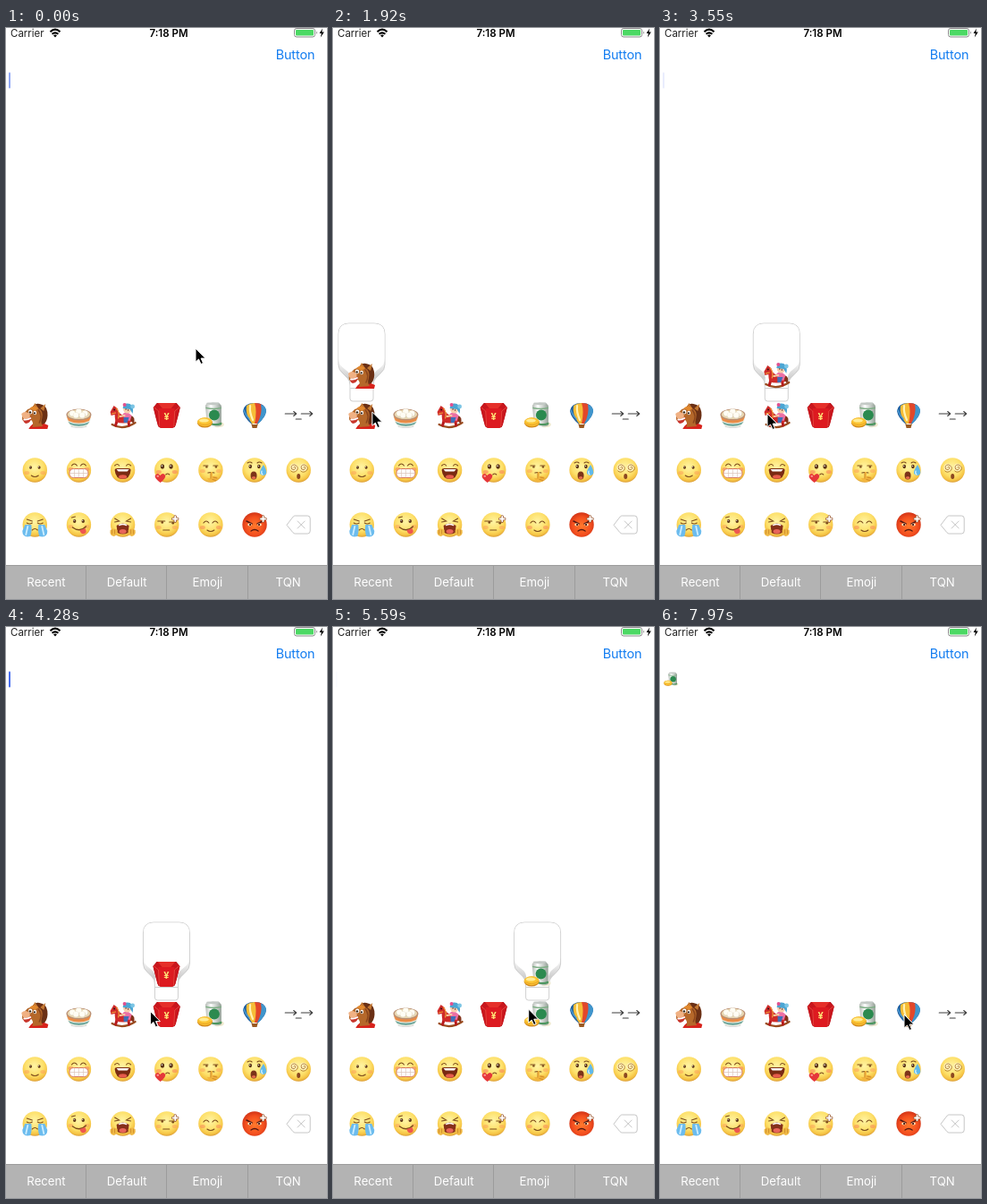
Animation, 359 px wide and 638 px high, one loop 8000 ms. Source, as an HTML page:

```html
<!DOCTYPE html>
<html lang="en">
<head>
<meta charset="utf-8">
<title>Emoticon keyboard</title>
<style>
  html, body { margin: 0; width: 100%; height: 100%; overflow: hidden; background: #fff; }
  svg { display: block; width: 100%; height: 100%; }
  text { font-family: Inter, Roboto, sans-serif; }
</style>
</head>
<body>
<svg id="stage" viewBox="0 0 359 638">
  <defs>
    <radialGradient id="skin" cx=".48" cy=".38" r=".62">
      <stop offset="0" stop-color="#fff4a4"/><stop offset=".6" stop-color="#fde06a"/>
      <stop offset=".86" stop-color="#f6c545"/><stop offset="1" stop-color="#dda038"/>
    </radialGradient>
    <radialGradient id="rage" cx=".5" cy=".55" r=".6">
      <stop offset="0" stop-color="#ff7a2c"/><stop offset=".6" stop-color="#f4501f"/>
      <stop offset="1" stop-color="#c92d14"/>
    </radialGradient>
    <linearGradient id="metal">
      <stop offset="0" stop-color="#b4bab4"/><stop offset=".35" stop-color="#fff"/>
      <stop offset="1" stop-color="#94a097"/>
    </linearGradient>
    <linearGradient id="shoulder" x2="0" y2="1">
      <stop offset=".45" stop-color="#fff"/><stop offset=".7" stop-color="#cfcfcf"/>
      <stop offset=".85" stop-color="#fff"/>
    </linearGradient>
  </defs>

  <g id="status">
    <text x="5" y="9.6" font-size="11.5" fill="#222">Carrier</text>
    <path d="M49.500 4.200q5.500-5 11 0M51.600 6.800q3.400-3 6.800 0" fill="none" stroke="#000" stroke-width="2.200"/>
    <path d="M53 8.300q2-1.500 4 0l-2 2.300z"/>
    <text x="182" y="9.600" font-size="11.500" font-weight="600" text-anchor="middle">7:18 PM</text>
    <rect x="322.500" y=".5" width="23" height="9.500" rx="2.500" fill="#fff" stroke="#8b8b8b"/>
    <rect x="324" y="2" width="20" height="6.500" rx="1" fill="#4cd964"/>
    <path d="M347 3.500q2 1.700 0 3.500z" fill="#8b8b8b"/>
    <path d="M354 .5l-3.500 5.500h2.300l-1 4.500 4-6h-2.500z"/>
  </g>
  <text x="323.500" y="35" font-size="14.400" text-anchor="middle" letter-spacing="-.1" fill="#127cf0">Button</text>

  <g id="keys"></g>
  <g id="tabs">
    <rect y="600" width="359" height="38" fill="#b3b3b3"/>
    <path d="M0 600.500H359M89.500 600V638M179.500 600V638M270.500 600V638" stroke="#9c9c9c"/>
  </g>

  <g id="typed"></g>
  <rect id="caret" y="49.500" width="2" height="18" rx="1" fill="#4a6ff0"/>
  <g id="popup">
    <path d="M-26 342q0-12 12-12h28q12 0 12 12v34q0 6-5 10l-5 5q-3 3-3 8v15q0 3-3 3h-20q-3 0-3-3v-15q0-5-3-8l-5-5q-5-4-5-10z"
      fill="url(#shoulder)" stroke="#c4c4c4" stroke-width=".8"/>
    <path d="M-25.500 342q0-11.500 11.500-11.500h28q11.500 0 11.500 11.500v28q0 6-4 9l-6 5q-3 3-3 8v10h-25v-10q0-5-3-8l-6-5q-4-3-4-9z" fill="#fff"/>
    <path d="M-12.500 402.500h25" stroke="#c4c4c4" stroke-width=".8"/>
    <g id="magnified"></g>
  </g>
  <path id="pointer" d="M0 0V15.200L3.500 12 6 17.500 8.500 16.400 6.100 11.100H11Z" fill="#000" stroke="#fff"/>
</svg>

<script>
const $ = id => document.getElementById(id);
const INK = '#7a4a1c';

// Drawing helpers, all centred on the key.
const dot = (x, y, r, fill) => `<circle cx="${x}" cy="${y}" r="${r}" fill="${fill}"/>`;
const oval = (x, y, rx, ry, fill) => `<ellipse cx="${x}" cy="${y}" rx="${rx}" ry="${ry}" fill="${fill}"/>`;
const fill = (d, color) => `<path d="${d}" fill="${color}"/>`;
const line = (d, color = INK, width = 1.1) =>
  `<path d="${d}" fill="none" stroke="${color}" stroke-width="${width}" stroke-linecap="round"/>`;
const face = (inner, skin = 'skin') => dot(0, 0, 13.7, `url(#${skin})`) + inner;
const blush = (y = 3, tint = '#fba05a88') => oval(-9, y, 3, 2, tint) + oval(9, y, 3, 2, tint);
const eyes = (y, r = 1.7, gap = 4.8) =>
  [-gap, gap].map(x => oval(x, y, r, r * 1.2, '#5a3214') + dot(x - .5, y - .7, r / 2.8, '#fff')).join('');
const arcs = (y, bend) => line(`M-8 ${y}q3 ${bend} 6 0M2 ${y}q3 ${bend} 6 0`);
const cross = line('M9.500-9v5M7-6.500h5', '#9c5a34', 3.400) + line('M9.500-9v5M7-6.500h5', '#fff', 1.8);

const horse =
  fill('M-7 15Q-2 6 6 7L15 11 14 15Z', '#d8231c') +
  fill('M-3-9Q0-14 5-13Q13-12 14-4Q15 4 11 9L4 11Z', '#6b3015') +
  fill('M-8-7Q-2-10 4-8Q10-5 8 3Q6 9 9 12L-3 13Q-1 8-4 5Q-11 9-14 5Q-16 0-8-7Z', '#b5682a') +
  fill('M-15-2Q-11-6-6-2Q-4 3-9 4Q-14 5-15-2Z', '#f0b184') +
  fill('M-13 4Q-7 4-4 1Q-4 8-10 9Q-13 8-13 4Z', '#c8352b') + line('M-12 4.500Q-8 5-5 3', '#fff', 1.8) +
  fill('M-3-8L0-14 4-8ZM6-8L12-13 10-5Z', '#c47731') + fill('M-6-8Q-1-13 4-8L0-5Z', '#e2892e') +
  oval(-5, -4, 2.200, 2.400, '#fff') + dot(-5.300, -3.600, 1.200, '#321') +
  oval(0, -3, 1.800, 2.200, '#fff') + dot(-.3, -2.600, 1.100, '#321') + line('M4-6Q9 0 5 8', '#8b451c', 1.500);

const bowl =
  oval(0, 12, 9, 1.8, '#ccc') +
  fill('M-14-1Q-13 12-5 13H5Q13 12 14-1Z', '#eef0e6') +
  fill('M-13.700 1Q-12 5-11.500 6Q0 11 11.500 6L13.700 1Q0 7-13.700 1Z', '#e98d48') +
  fill('M-12 7Q0 12 12 7L9.500 10Q0 14-9.500 10Z', '#72aaa0') +
  oval(0, -1, 14, 6.5, '#b98f74') + oval(0, -1.3, 12.6, 5.4, '#ead9b2') +
  [[-7, -2], [0, -4], [7, -2], [-3, 0], [4, 0]].map(([x, y]) => dot(x, y, 3.6, '#dfd4bd') + dot(x - .2, y - .5, 3.1, '#fffdf4')).join('');

const rocker =
  line('M-12 10Q0 17 14 8', '#9a4b1e', 2.2) + line('M-8 11L-6 4M7 11L6 4', '#b51b1d', 3) +
  fill('M-14-4L-10-11-6-8Q-4 0 3 0Q11-1 10 7Q0 10-8 7Q-9 2-9-1L-13 0Z', '#cf2b2a') +
  line('M-7-8Q-3-3-5 3M-12-2L-8-3', '#f1a23a', 1.200) + dot(-9.500, -6.500, 1, '#311') +
  fill('M9 0Q15 2 12 9L9 6Z', '#82331c') +
  fill('M0-2Q5-6 10 0L8 6 2 5Z', '#ec6fa4') + line('M2 0L-3 1', '#f7cda3', 2) +
  fill('M1 2H7L5 8H1Z', '#3f6fb8') +
  dot(5, -7, 4.500, '#f9cfad') + fill('M0-8Q1-15 8-13Q13-10 11-2L8-7Z', '#4ba6d4') +
  dot(2, -12, 2, '#e2508e') + dot(11, -10, 2.400, '#7cc5e4') + dot(3.500, -7, .7, '#422') + dot(6, -6, .7, '#422');

const envelope =
  fill('M-11-14H11L15-9 12 3 9 13Q0 15-9 13L-12 3-15-9Z', '#a90f17') +
  fill('M-15-9L-10-14-5-8-7 14-10 11ZM15-9L10-14 5-8 7 14 10 11Z', '#c9161d') +
  fill('M-10-14H10L5-8H-5Z', '#e5302a') + fill('M-9-8H9L7 14H-7Z', '#dd1a20') +
  line('M-14-9L-9-5-8 12M14-9L9-5 8 12', '#f0564a', .7) +
  '<text y="5" font-size="11" font-weight="700" fill="#ffe176" text-anchor="middle">¥</text>';

const can =
  fill('M7 8Q14 6 15 10Q14 14 5 13Z', '#f0ead0') +
  fill('M-6-11L-4-14.500H9L12-11 12 11Q6 14-4 11Z', 'url(#metal)') +
  oval(2.500, -13.200, 7, 1.500, '#c3c9c5') + line('M-5-8.500Q3-6.500 11.500-8.500', '#7fae86', 1.500) +
  dot(4, -.5, 6, '#2b8a4f') + line('M1 9.500Q7 11 11.500 9', '#4d9660', 2.200) +
  oval(-6.500, 8, 8.500, 5.500, '#cf8418') + oval(-6.500, 7.300, 8.200, 5, '#fbc433') +
  oval(-7.500, 5.600, 5.500, 2, '#ffec94') + line('M-13 9Q-6 13 1 8', '#e6a024', .9);

const balloon =
  line('M-4 7L-2.500 11M4 7L2.500 11', '#8b5425', 1) + fill('M-3.500 10H3.500L2.500 14H-2.500Z', '#9a5a24') +
  fill('M-13-5Q-12-14 0-14Q12-14 13-5Q12 2 4 9H-4Q-12 2-13-5Z', '#1f5f9f') +
  fill('M-9-11Q-5-14 0-14H2Q5-3 1 9H-3Q-11-1-9-11Z', '#f6bd37') +
  fill('M0-14Q6-14 8-12Q10-2 3 9H0Q3-5 0-14Z', '#e2472a') +
  fill('M7-12.500Q13-10 13-5Q12 2 4 9H3Q9-2 7-12.500Z', '#3f95cc') +
  line('M-12-6Q-10 0-6 4', '#4a9ad2', 1.500) + line('M-5-11Q-6-4-2 5', '#fff3b4', 2.200);

const arrows = line('M-15-2H-2.500M-5.500-4.500L-2.500-2-5.500 .5M3-2H15.500M12.500-4.500L15.500-2 12.500 .5', '#3c3c3c', 1.100) + line('M-3 4H3', '#3c3c3c', 1.100);

const hands = [-1, 1].map(side => `<g transform="scale(${side} 1)">` +
  fill('M6 6Q10 3 14 6Q15 12 10 13Q6 12 6 6Z', '#f0b944') + line('M9 6V10M12 6V10', '#c98527', .8) + '</g>').join('');

const smile = face(blush(3) + eyes(-3, 1.5) + line('M-4 6Q0 9 4 6'));
const grin = face(arcs(-5, -4) + blush(-1, '#f5845a99') +
  '<rect x="-10.500" y="-1.500" width="21" height="10" rx="4.500" fill="#fff" stroke="#d8755a"/>' +
  line('M-10 3.500H10M-5-1V8M0-1V8M5-1V8', '#dcc3b8', .7));
const laugh = face(line('M-9-5Q-6-8-4-5M4-5Q6-8 9-5') + fill('M-9 0Q-9-2-6-2H6Q9-2 9 0Q8 10 0 10Q-8 10-9 0Z', '#7a2a12') +
  fill('M-7-1H7L5 1.500H-5Z', '#fff') + oval(0, 7.500, 4.500, 2.200, '#e65b4b'));
const kiss = face(eyes(-4, 2.2) + blush(2, '#f8865a99') + line('M-1 5q2-2 4 0') +
  fill('M-7 14Q-14 9-13 6Q-10 2-7.500 6Q-4 2-1.500 6Q-1 9-7 14Z', '#e5373a') + oval(-10, 6.800, 1.4, 1, '#ff9a95'));
const hush = face(line('M-8-5H-3M3-5H8') + dot(-4.500, -3.600, 1.200, INK) + dot(6, -3.600, 1.200, INK) + line('M-3 3Q0 2 4 3') + blush(1) +
  fill('M0 2H2V7Q8 6 8 10Q5 14-1 13L-4 9H0Z', '#f3b63e') + line('M0 3V9M3 8L7 9M2 10.500L6 11.500', '#c57b25', .8));
const shock = face(line('M-8-8Q-5-10-3-8M3-8Q5-10 8-8') + eyes(-4, 1.8) + oval(-1, 6, 3.500, 4.500, '#7c3419') + oval(-1, 8.500, 2.200, 1.500, '#e66a4c') +
  fill('M10-6Q14 1 13 4Q10 8 6 4Q5 1 10-6Z', '#5fb9ec') + line('M8 1Q7 4 9 5', '#d9f5ff', 1.2));
const spiral = x => `<g transform="translate(${x} -3)">${dot(0, 0, 4.3, '#fff3bd')}${line('M0 0q2-2 2 1q-1 3-4 1q-2-5 3-5q5 2 3 6q-4 4-7 1', '#a46b26', .8)}</g>`;
const dizzy = face(spiral(-5.5) + spiral(5.5) + oval(0, 7, 2, 3, '#8c4820'));

const cry = face(line('M-9-6L-3-4M9-6L3-4M-9-2Q-6 0-3-2M3-2Q6 0 9-2') +
  fill('M-11 0H-4Q-3 8-5 13Q-14 15-14 7ZM11 0H4Q3 8 5 13Q14 15 14 7Z', '#6cbcee') +
  line('M-8 2L-10 11M8 2L10 11', '#cdeeff', 1.8) + line('M-3 6Q0 3 3 6'));
const yum = face(eyes(-4, 1.7) + line('M-8-8L-4-9') + blush(2) +
  line('M-7 3Q1 9 8 2', INK, 1.3) + fill('M1 6L7 4Q10 9 6 10Q2 11 1 6Z', '#ee5750'));
const wail = face(line('M-9-7L-4-4-9-3M9-7L4-4 9-3') + fill('M-7 1Q0-4 7 1L6 9Q0 12-6 9Z', '#86301a') +
  oval(0, 7.500, 4, 2.500, '#e8655a') + line('M-4 .5Q0-1.500 4 .5', '#fff', 1.5) + hands);
const doubt = face(line('M-10-4H-2M3-3H10') + dot(-5, -2.600, 1.300, INK) + dot(7, -1.700, 1.300, INK) + line('M-4 6H3') + blush(3) + cross);
const shy = face(arcs(-2, -4) + blush(3, '#f98f5a99') + line('M-4 6Q0 9 4 6'));
const angry = face(line('M-9-4L-3-1M9-4L3-1', '#541811', 1.600) + oval(-5.500, 0, 2.300, 1.400, '#ffe9c0') + oval(5.500, 0, 2.300, 1.400, '#ffe9c0') +
  dot(-5, 0, 1.100, '#300') + dot(5, 0, 1.100, '#300') + line('M-4 7Q0 4 4 7', '#541811', 1.300) + cross, 'rage');
const erase = line('M-13 0L-6-9Q-5-10-4-10H10Q13-10 13-7V7Q13 10 10 10H-4Q-5 10-6 9ZM-1-4L7 4M7-4L-1 4', '#c6c6c6', 1);

const rows = [
  [horse, bowl, rocker, envelope, can, balloon, arrows],
  [smile, grin, laugh, kiss, hush, shock, dizzy],
  [cry, yum, wail, doubt, shy, angry, erase]
];
const keyX = col => 32.300 + col * 49.150;
const place = (art, x, y, scale = 1) => `<g transform="translate(${x} ${y}) scale(${scale})">${art}</g>`;

$('keys').innerHTML = rows.map((row, r) => row.map((art, c) => place(art, keyX(c), 433 + r * 61)).join('')).join('');
$('tabs').innerHTML += ['Recent', 'Default', 'Emoji', 'TQN'].map((name, i) =>
  `<text x="${45 + i * 90.200}" y="624" font-size="13.200" fill="#fff" text-anchor="middle">${name}</text>`).join('');
$('typed').innerHTML = place(can, 12.5, 58.5, .54);

// The screen refreshes in evenly spaced runs: first time, last time, count.
const LOOP = 8000, INSERT = 5890, REBLINK = 6640;
const ticks = [0, ...[
  [150, 1040, 7], [1480, 2520, 8], [2660, 3700, 8], [3840, 4860, 8],
  [5010, 6040, 8], [6640, 7680, 8], [7820, 7970, 2]
].flatMap(([from, to, n]) => Array.from({ length: n }, (_, i) => Math.floor((from + (to - from) * i / (n - 1)) / 10) * 10))];

const pointerPath = [
  [0, 212, 358], [150, 200, 364], [450, 130, 395], [750, 60, 422], [1040, 35, 427], [1480, 35, 427],
  [2520, 56, 432], [3550, 120, 431], [3700, 129, 431], [4860, 195, 428], [5010, 218, 425], [5450, 219, 428],
  [5890, 218, 425], [6640, 218, 425], [7680, 272, 432], [7970, 273, 433], [8000, 273, 433]
];
const blink = [[0, .6], [10, 1], [480, 1], [520, .45], [550, .12], [600, 0], [970, 0], [1000, .6]];
const presses = [[1480, 2520], [2660, 3250], [3250, 4130], [4130, 5010], [5010, INSERT]];

function sample(keys, t) {
  const i = Math.max(1, keys.findIndex(k => k[0] >= t));
  const a = keys[i - 1], b = keys[i];
  const f = (t - a[0]) / (b[0] - a[0]);
  return a.slice(1).map((v, n) => v + (b[n + 1] - v) * f);
}

let shownKey = -1;
function draw(t) {
  const inserted = t >= INSERT;
  $('pointer').setAttribute('transform', `translate(${sample(pointerPath, t)})`);
  $('typed').style.display = inserted ? '' : 'none';
  $('caret').setAttribute('x', inserted ? 19.500 : 3);
  $('caret').style.opacity = inserted && t < REBLINK ? 1 : sample(blink, t % 1000)[0];

  const key = presses.findIndex(([from, to]) => t >= from && t < to);
  $('popup').style.display = key < 0 ? 'none' : '';
  if (key < 0) return;
  if (key !== shownKey) $('magnified').innerHTML = rows[0][key];
  shownKey = key;
  $('popup').setAttribute('transform', `translate(${keyX(key) - .3} 0)`);
  $('magnified').setAttribute('transform', `translate(0 ${t - presses[key][0] < 100 ? 401 : 388})`);
}

const start = performance.now();
function frame() {
  const t = (performance.now() - start) % LOOP;
  draw(ticks.findLast(tick => tick <= t));
  requestAnimationFrame(frame);
}
frame();
</script>
</body>
</html>
```
